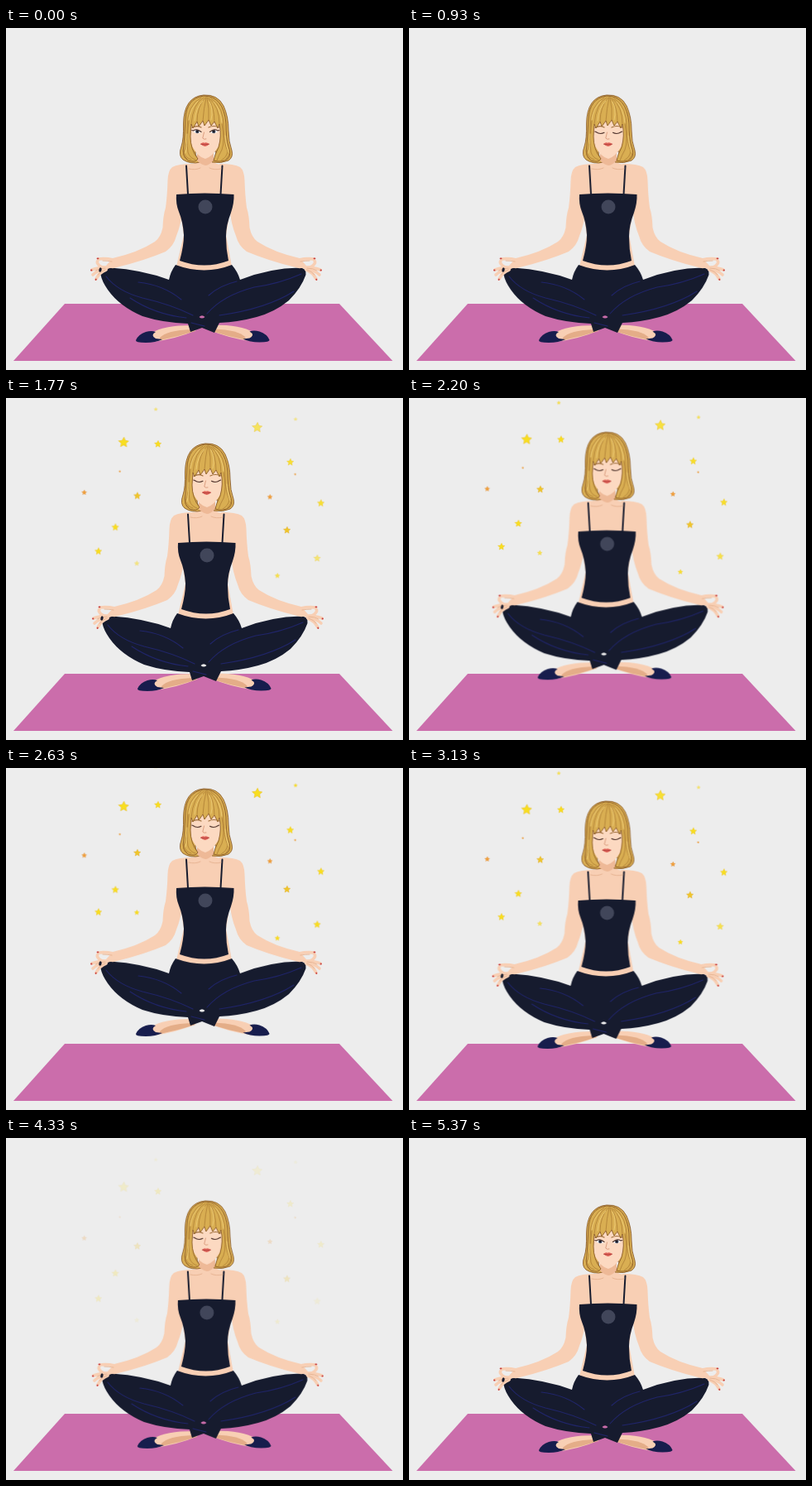
An HTML page without scripts that plays this animation: 480 px wide and 413 px high, repeating every 5.41 s.

```html
<!DOCTYPE html>
<html lang="en">
<head>
<meta charset="utf-8">
<title>Levitating meditation</title>
<style>
  html, body { margin: 0; width: 100%; height: 100%; overflow: hidden; background: #ededed; }
  svg { display: block; width: 100vw; height: 100vh; }

  .rise, .sway, .open, .closed, .stars use { animation: 5.41s linear infinite; }
  .rise { animation-name: rise; }
  .sway { animation-name: sway; }
  .open { animation-name: open; }
  .closed { animation-name: closed; }
  .stars use { animation-name: star; }

  @keyframes rise {
    0%, 17.2% { transform: translateY(0); }
    23.5% { transform: translateY(-11.3px); }
    32.7% { transform: translateY(-26px); }
    37.9% { transform: translateY(-34px); }
    48.6% { transform: translateY(-56px); }
    83.2%, 100% { transform: translateY(0); }
  }
  @keyframes sway {
    0%, 17.2%, 83.2%, 100% { transform: translateX(0); }
    23.5% { transform: translateX(3px); }
    27.7% { transform: translateX(4.5px); }
    32.7% { transform: translateX(2px); }
    37.9%, 61.5% { transform: translateX(0); }
    42.5%, 56% { transform: translateX(-2.3px); }
    48.6% { transform: translateX(0); }
    69.7% { transform: translateX(4px); }
    73% { transform: translateX(4.5px); }
    79.5% { transform: translateX(2.2px); }
  }
  @keyframes open {
    0%, .5% { opacity: 1; }
    8.7%, 91.8% { opacity: 0; }
    99.2%, 100% { opacity: 1; }
  }
  @keyframes closed {
    0%, .5% { opacity: 0; }
    8.7%, 91.8% { opacity: 1; }
    99.2%, 100% { opacity: 0; }
  }
  /* --d: how far below its peak a star starts, --o: brightness early in the fade */
  @keyframes star {
    0%, 17.2% { opacity: 0; transform: translateY(var(--d)); }
    23.5% { opacity: var(--o); }
    32.7% { opacity: min(1, var(--o) * 2); }
    48.6% { opacity: 1; transform: translateY(0); }
    57.9% { opacity: min(1, var(--o) * 2.6); }
    69.7% { opacity: min(1, var(--o) * 1.5); }
    83.2%, 100% { opacity: 0; transform: translateY(var(--d)); }
  }

  .line { fill: none; stroke-linecap: round; stroke-linejoin: round; }
  .skin { fill: #f8cfb4; }
  .shade { fill: #e4ad88; }
  .cloth { fill: #161b2e; }
  .shoe { fill: #171d4d; }
  .fold { stroke: #20256a; stroke-width: 1.1; }
  .finger { stroke: #f8cfb4; stroke-width: 3.6; }
  .nail { stroke: #c8403f; stroke-width: 1.8; }
  .crease { stroke: #e6b391; stroke-width: .9; }
  .hair { fill: #d9ae52; stroke: #8b5c2a; stroke-width: .9; }
  .strand { stroke: #a87832; stroke-width: .7; }
  .gleam { stroke: #efcd78; stroke-width: .9; }
  .lash { stroke: #4b3029; stroke-width: 1.1; }
  .yellow { fill: #f8de20; stroke: #e8bd22; }
  .gold { fill: #f0c62a; stroke: #d8a11d; }
  .orange { fill: #f0a03c; stroke: #d98225; }
  .stars { stroke-width: .08; }
</style>
</head>
<body>
<svg viewBox="0 0 480 413" preserveAspectRatio="none">
  <defs>
    <path id="star" d="M.1-1 .37-.38 1-.25.5.18.6.85.03.5-.55.82-.42.17-.95-.3-.27-.36Z"/>
    <g id="arm">
      <path class="skin" d="M226 164Q208 164 201 168Q196 172 195.500 184Q195 202 193 217Q190 226 189.500 241Q187 253 180 258Q160 271 129 278L121 287Q127 292 134 289Q167 281 193 270Q203 263 206 251Q212 236 213 222L224 190Z"/>
      <g class="line finger">
        <path d="M130 280Q120 278 112 279"/>
        <path d="M126 288Q117 291 113 287Q109 283 111 281"/>
        <path d="M123 289Q111 289 104 292"/>
        <path d="M121 291Q110 293 105 298"/>
        <path d="M121 292Q113 295 109 303"/>
      </g>
      <path class="line nail" d="M110.500 278.300h1M103 292.500l.5 0M108.500 304l.3-.5"/>
      <path class="line crease" d="M120 290Q113 290 108 293M120 292Q114 294 111 298M128 282Q122 281 117 281"/>
    </g>
    <g id="foot">
      <path class="skin" d="M176 368Q192 359 224 359L230 365Q207 375 178 379Z"/>
      <path class="shade" d="M186 374Q194 365 224 364L229 366Q207 373 186 377Z"/>
      <path class="shoe" d="M157 377Q160 370 169 367Q176 365 181 367Q174 371 181 375L189 376Q181 380 169 380Q156 380 157 377Z"/>
    </g>
    <g id="lid"><path class="line lash" d="M226 125.500Q231 129 236 126.300M226 125.500l-1.200-.4"/></g>
    <g id="eye">
      <path d="M226 125Q231 120.500 236 126Q231 129 226 125Z" fill="#fff"/>
      <circle cx="231.300" cy="125" r="2.300" fill="#4a5368"/>
      <circle cx="231.300" cy="125" r="1.200" fill="#171820"/>
      <path class="line lash" d="M224.800 123.500L226.500 124Q231 120.800 236 125.500"/>
    </g>
  </defs>

  <path d="M71 333H403L467.500 402H9Z" fill="#cb6dab"/>

  <g class="stars">
    <g class="yellow">
      <g transform="translate(142 46.500)"><use href="#star" style="--d:14px;--o:.5" transform-origin="0 0" class="s6"/></g>
      <g transform="translate(303.500 30.500)"><use href="#star" class="s6" style="--d:10px;--o:.35"/></g>
      <g transform="translate(183.500 44.500)"><use href="#star" class="s4" style="--d:22px;--o:.6"/></g>
      <g transform="translate(181 -2)"><use href="#star" class="s2" style="--d:31px;--o:.3"/></g>
      <g transform="translate(350 21)"><use href="#star" class="s2" style="--d:9px;--o:.25"/></g>
      <g transform="translate(343.500 75)"><use href="#star" class="s4" style="--d:5px;--o:.45"/></g>
      <g transform="translate(380.500 125)"><use href="#star" class="s4" style="--d:4px;--o:.45"/></g>
      <g transform="translate(132 147)"><use href="#star" class="s4" style="--d:18px;--o:.65"/></g>
      <g transform="translate(111.500 174)"><use href="#star" class="s4" style="--d:22px;--o:.6"/></g>
      <g transform="translate(158 174.500)"><use href="#star" class="s3" style="--d:50px;--o:.27"/></g>
      <g transform="translate(328 205.500)"><use href="#star" class="s3" style="--d:18px;--o:.4"/></g>
      <g transform="translate(376 189)"><use href="#star" class="s4" style="--d:9px;--o:.3"/></g>
    </g>
    <g class="gold">
      <g transform="translate(158.500 102.500)"><use href="#star" class="s4" style="--d:31px;--o:.8"/></g>
      <g transform="translate(339.500 146.500)"><use href="#star" class="s4" style="--d:26px;--o:.75"/></g>
    </g>
    <g class="orange">
      <g transform="translate(94.500 105.500)"><use href="#star" class="s3" style="--d:17px;--o:.75"/></g>
      <g transform="translate(319 112.500)"><use href="#star" class="s3" style="--d:14px;--o:.65"/></g>
      <g transform="translate(137.500 80)"><use href="#star" class="s1" style="--d:17px;--o:.5"/></g>
      <g transform="translate(349.500 87)"><use href="#star" class="s1" style="--d:10px;--o:.7"/></g>
    </g>
  </g>
  <style>
    .s1 { scale: 1.4; } .s2 { scale: 2.3; } .s3 { scale: 3.1; } .s4 { scale: 4.3; } .s6 { scale: 6.3; }
    .stars use { transform-origin: 0 0; translate: 0 0; }
    /* travel is set in pixels, so undo the star's own scale */
    .s1 { --k: 1.4; } .s2 { --k: 2.3; } .s3 { --k: 3.1; } .s4 { --k: 4.3; } .s6 { --k: 6.3; }
    @keyframes star {
      0%, 17.2% { opacity: 0; transform: translateY(calc(var(--d) / var(--k))); }
      23.5% { opacity: var(--o); }
      32.7% { opacity: min(1, var(--o) * 2); }
      48.6% { opacity: 1; transform: translateY(0); }
      57.9% { opacity: min(1, var(--o) * 2.6); }
      69.7% { opacity: min(1, var(--o) * 1.5); }
      83.2%, 100% { opacity: 0; transform: translateY(calc(var(--d) / var(--k))); }
    }
  </style>

  <g class="rise"><g class="sway">
    <use href="#foot"/>
    <use href="#foot" transform="matrix(-1 0 0 1 475.500 -.5)"/>

    <path class="skin" d="M231 148H251V161Q253 165 262 165L275 196L266 250L273 288Q240 298 206 288L215 250L207 200L220 165Q231 164 231 160Z"/>

    <path class="cloth" fill-rule="evenodd" d="M205 286Q240 299 273 286Q280 294 283 304Q318 290 355 289.500Q364 290 362.500 298Q357 314 342 329Q325 343 303 349Q281 355 258 356L252 368L237 362L223 367L220 357Q190 356 165 348Q137 336 123 316Q116 306 114.500 298Q115 290 126 289.500Q165 292 197 304Q199 294 205 286ZM233.500 349Q237 345.500 240.500 349Q237 352 233.500 349Z"/>
    <g class="line fold">
      <path d="M121 300Q135 318 165 326Q200 334 226 347"/>
      <path d="M160 307Q190 310 212 328M150 326Q180 346 218 350"/>
      <path d="M357 297Q330 309 300 313Q262 323 243 345"/>
      <path d="M279 306Q258 311 245 323M348 318Q315 339 258 347M224 356L240 360"/>
    </g>

    <use href="#arm"/>
    <use href="#arm" transform="matrix(-1 0 0 1 484 0)"/>
    <ellipse cx="114" cy="292" rx="1.600" ry="2.700" fill="#171b2d" transform="rotate(15 114 292)"/>

    <path class="cloth" d="M206 201Q240 198 275.500 201Q276 211 272 223Q266 238 266 252Q266 267 269 281Q240 292 210 281Q215 263 215 250Q214 234 209 222Q205 212 206 201Z"/>
    <path class="line" d="M218 166.500L220 201M261.500 166.500L259.500 201" stroke="#161b2e" stroke-width="2"/>
    <path class="line crease" d="M221 170Q229 172 235 169M246 169Q252 172 260 170"/>
    <circle cx="241" cy="216" r="8.500" fill="#41465a"/>

    <path class="hair" d="M239 81Q256 80 263 94Q269 107 269 124Q269 137 273 148Q275 156 269 160Q260 164 249 162Q254 157 254 149H229Q229 157 235 162Q223 165 214 159Q208 154 212 143Q215 134 214.500 116Q215 83 239 81Z"/>
    <path d="M231 146H251V160Q245 166 241 166Q234 164 231 160Z" fill="#eeb997"/>
    <path d="M222 112Q221 133 225 143Q232 156 241 158Q250 155 257 143Q261 132 260 112Q242 101 222 112Z" fill="#fcd9c1"/>

    <path class="line" d="M225 120.300Q231 117 236 120M245 120Q251 117 258 120" stroke="#9b6a36" stroke-width="1.200"/>
    <g class="open"><use href="#eye"/><use href="#eye" transform="matrix(-1 0 0 1 482.500 0)"/></g>
    <g class="closed"><use href="#lid"/><use href="#lid" transform="matrix(-1 0 0 1 482.500 0)"/></g>
    <path class="line" d="M239.500 126L237.800 133Q239 135 242 134" stroke="#d79879" stroke-width=".9"/>
    <path d="M235 140Q238 137.500 240 138.700Q242 137.500 246 140Q241 146 235 140Z" fill="#df6258"/>
    <path class="line" d="M235.500 140.300Q240 141.500 245.500 140.300" stroke="#a43c39" stroke-width=".7"/>

    <path class="hair" d="M239 82Q218 85 217 110Q216 128 215 142Q212 155 220 160Q229 163 232 158Q223 147 223 131L224 116L226 121L231 113L233 119L238 112L240 118L245 111L248 118L252 113L256 121L258 116Q261 130 257 144Q252 154 251 160Q261 163 268 158Q273 153 269 143Q266 134 266 115Q263 82 239 82Z"/>
    <g class="line strand">
      <path d="M239 84Q226 91 224 116M241 84Q231 95 231 113M242 84Q239 97 238 112M243 84Q246 97 245 111M244 84Q252 95 252 113M246 85Q258 95 258 116"/>
      <path d="M236 84Q219 93 219 120Q220 139 215 150Q217 157 224 159M221 112Q218 137 220 150Q222 157 229 159M215 149Q213 154 219 158"/>
      <path d="M248 85Q264 95 263 122Q263 138 268 149Q267 156 260 160M261 116Q265 136 261 147Q257 154 255 160M270 148Q271 154 266 158"/>
    </g>
    <g class="line gleam">
      <path d="M232 88Q222 98 221 111M238 88Q229 97 228 112M246 89Q251 98 248 111M251 89Q260 99 261 114M219 128Q219 142 217 151M265 130Q266 142 269 150"/>
    </g>
  </g></g>
</svg>
</body>
</html>
```
